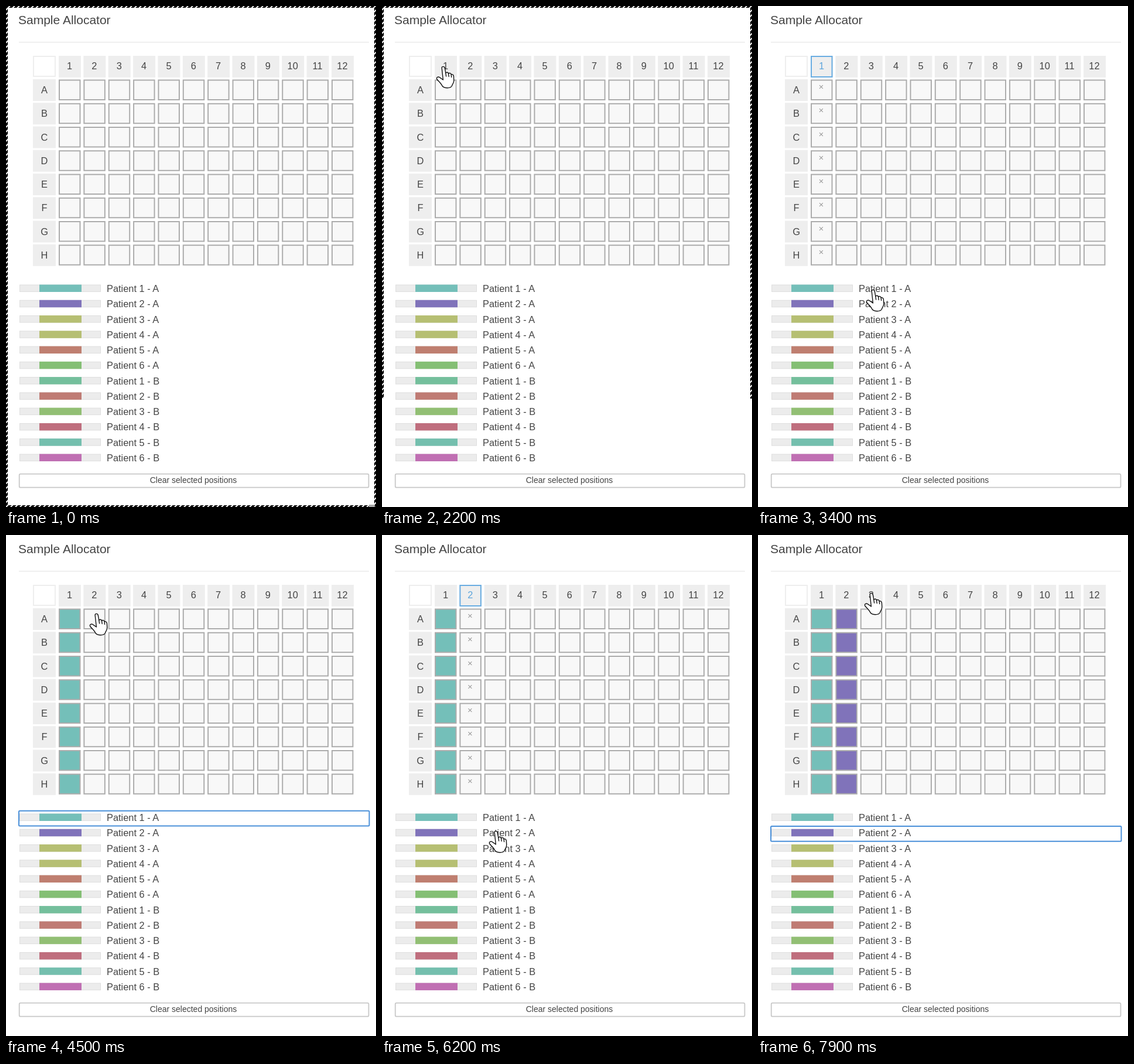
An HTML page that plays this animation: 632x855 px, repeating every 8000 ms.

```html
<!DOCTYPE html>
<html lang="en">
<head>
<meta charset="utf-8">
<title>Sample Allocator</title>
<style>
html, body { margin: 0; width: 100%; height: 100%; overflow: hidden; background: #fff; }
svg { display: block; width: 632px; height: 855px; }
text { font: 16.4px "Liberation Sans", Arial, sans-serif; fill: #444; }
.mid { text-anchor: middle; }
.cell { fill: #f8f8f8; stroke: #acacac; stroke-width: 2; }
.mark { font-size: 15px; fill: #999; }
.focus { fill: none; stroke: #4a90d9; stroke-width: 2; }
</style>
</head>
<body>
<svg id="stage" viewBox="0 0 632 855"></svg>
<script>
const LOOP = 8000;
const COLORS = ['#74bfb9', '#8073ba', '#b6bf73', '#b6bf73', '#bf7f70', '#84bf74',
  '#74bf9c', '#bf7b74', '#92bf74', '#bf6e7e', '#74bfae', '#c06fb3'];
// When each column is picked, then filled with a sample colour
const PICKS = [{ pick: 2500, fill: 3900, blur: 5400 }, { pick: 5400, fill: 6800, blur: LOOP }];
// Pointer stops: time, x, y; each is held until the next
const STOPS = [[1400, 200, 500], [1700, 150, 225], [2000, 112, 125], [2200, 105, 103],
  [2800, 122, 150], [3100, 185, 430], [3400, 197, 484], [4200, 172, 218], [4500, 155, 134],
  [4800, 151, 116], [5000, 150, 109], [5700, 178, 385], [6000, 193, 480], [6200, 195, 505],
  [7100, 196, 415], [7400, 196, 205], [7700, 195, 118], [7900, 194, 99]];

const stage = document.getElementById('stage');
const colX = c => 90 + 42.36 * c;
const rowY = r => 125.5 + 40.25 * r;
const listY = i => 470 + 26.27 * i;
const rect = (x, y, w, h, attrs = '') =>
  `<rect x="${x}" y="${y}" width="${w}" height="${h}" ${attrs}/>`;
const label = (x, y, str, attrs = '') => `<text x="${x}" y="${y}" ${attrs}>${str}</text>`;

let out = `<defs><pattern id="stripes" width="5.66" height="5.66"
  patternUnits="userSpaceOnUse" patternTransform="rotate(45)">
  ${rect(0, 0, 6, 6, 'fill="#fff"')}${rect(0, 0, 3.7, 6, 'fill="#000"')}</pattern></defs>`;
out += label(21, 31, 'Sample Allocator', 'style="font-size:21px"');
out += rect(22, 61, 598, 1.6, 'fill="#ececec"');
out += rect(47, 86, 37, 34, 'fill="#fff" stroke="#eee" stroke-width="2"');

for (let c = 0; c < 12; c++) {
  out += rect(colX(c), 85, 38, 37, 'fill="#eee"');
  out += rect(colX(c) + 1, 86, 35.5, 35, `id="head${c}" fill="none" stroke="#69ade2" stroke-width="2" visibility="hidden"`);
  out += label(colX(c) + 18.5, 108, c + 1, `id="num${c}" class="mid"`);
}
for (let r = 0; r < 8; r++) {
  out += rect(46, rowY(r) - 0.5, 39, 37, 'fill="#eee"');
  out += label(65.5, rowY(r) + 23.5, 'ABCDEFGH'[r], 'class="mid"');
  for (let c = 0; c < 12; c++) {
    out += rect(colX(c) + 1, rowY(r) + 1, 35.5, 33.5, `class="cell col${c}"`);
    if (c < PICKS.length)
      out += label(colX(c) + 18, rowY(r) + 17.5, '×', `class="mid mark mark${c}"`);
  }
}
COLORS.forEach((color, i) => {
  const y = listY(i);
  out += rect(23.5, y + 6, 138, 11.5, 'fill="#ececec" stroke="#dedede"');
  out += rect(57, y + 5.5, 72, 12.5, `fill="${color}"`);
  out += label(172, y + 18, `Patient ${i % 6 + 1} - ${i < 6 ? 'A' : 'B'}`);
  out += rect(22, y + 0.8, 598.5, 25.7, `id="focus${i}" class="focus" rx="1.5" visibility="hidden"`);
});
out += rect(22.7, 798.7, 596.8, 23, 'rx="2" fill="#fff" stroke="#c8c8c8" stroke-width="1.8"');
out += label(320, 814, 'Clear selected positions', 'class="mid" style="font-size:14px"');
out += `<g id="frame" fill="url(#stripes)">${rect(0, 0, 632, 3)}
  ${rect(0, 0, 3, 855, 'id="left"')}${rect(629, 0, 3, 855, 'id="right"')}
  ${rect(0, 852, 632, 3, 'id="bottom"')}</g>`;
out += rect(620, 851, 10, 4, 'id="grip" fill="#aaa"');
out += `<g id="hand" stroke="#111" stroke-width="1.4" stroke-linejoin="round" stroke-linecap="round">
  <path fill="#fff" d="M-2.8 3C-3.2 -.4 1.6 -.6 2.3 3L3.8 11.5C5 9.5 8 10 8.5 12.3
    C10 10.8 13 11.6 13.2 14C15 13 17.2 14.2 17.4 17L17.8 24C17.8 29 15 30 14.3 33.5
    C12 38 1 37.5 -2 33.5C-4 29 -8 26 -11.2 22C-13 18.5 -8.5 16.8 -5.8 19.4L-.6 23Z"/>
  <path fill="none" d="M3.8 11.5L4.6 17M8.5 12.3L9.2 17.5M13.2 14L13.6 18.5"/></g>`;
stage.innerHTML = out;

const $ = id => document.getElementById(id);
const show = (el, on) => el.setAttribute('visibility', on ? 'visible' : 'hidden');

function draw(t) {
  PICKS.forEach(({ pick, fill, blur }, c) => {
    const picked = t >= pick && t < fill;
    show($('head' + c), picked);
    $('num' + c).style.fill = picked ? '#5ba4dc' : '';
    show($('focus' + c), t >= fill && t < blur);
    stage.querySelectorAll('.mark' + c).forEach(el => show(el, picked));
    stage.querySelectorAll('.col' + c).forEach(el => el.style.fill = t >= fill ? COLORS[c] : '');
  });
  // The striped frame goes away in blocks
  show($('frame'), t < 2500);
  show($('grip'), t < 900);
  $('left').setAttribute('height', t < 1100 ? 855 : 670);
  $('right').setAttribute('height', t < 900 ? 855 : 670);
  $('bottom').setAttribute('width', t < 900 ? 632 : t < 1100 ? 320 : 0);

  const stop = STOPS.filter(s => s[0] <= t).pop();
  show($('hand'), stop);
  if (stop) $('hand').setAttribute('transform', `translate(${stop[1]} ${stop[2]})`);
}

const start = performance.now();
function tick() {
  draw((performance.now() - start) % LOOP);
  requestAnimationFrame(tick);
}
tick();
</script>
</body>
</html>
```
